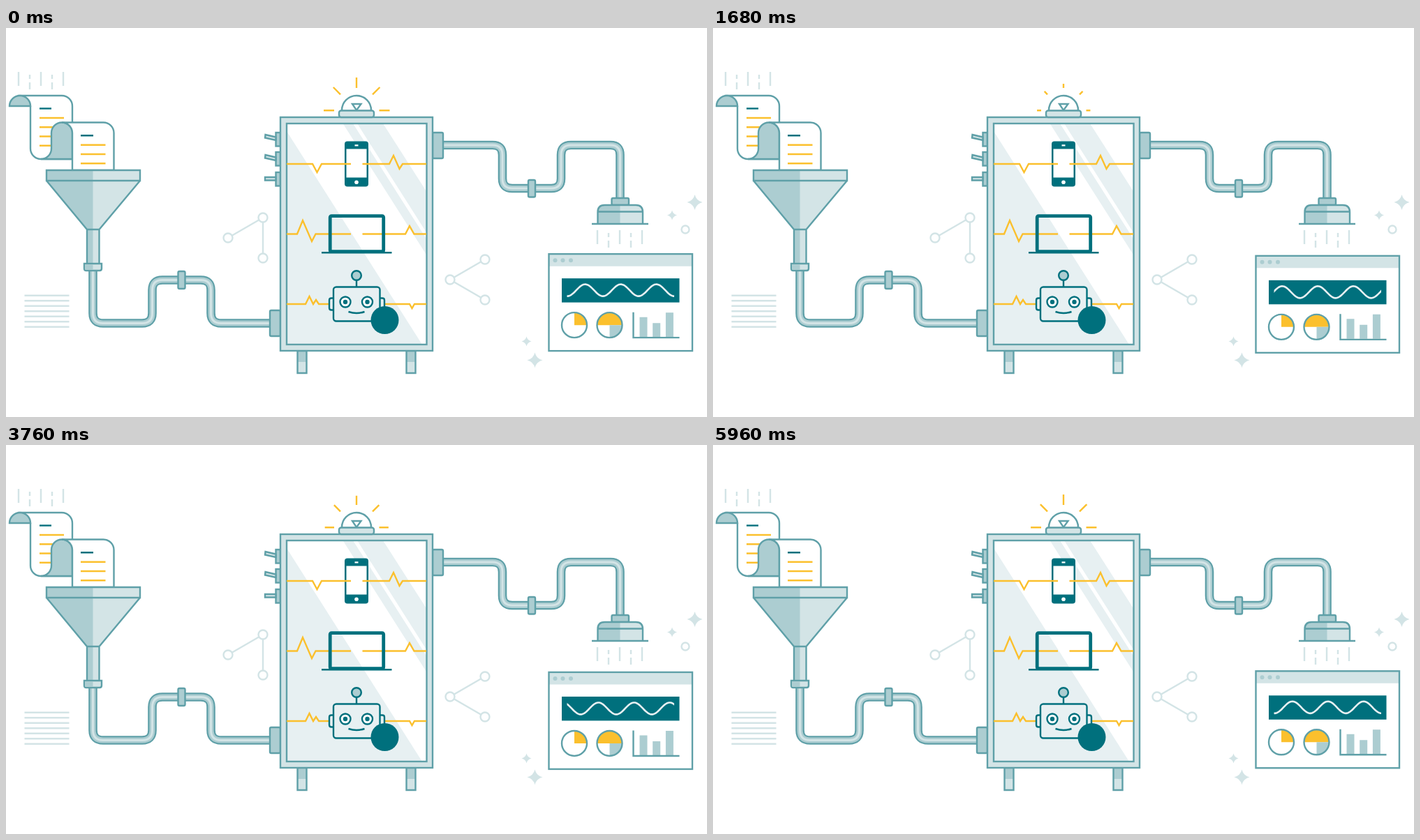
An HTML page for the animation above (6 s loop, 1004 by 558 pixels).

```html
<!DOCTYPE html>
<html lang="en">
<head>
<meta charset="utf-8">
<title>Content machine</title>
<style>
  html, body { margin: 0; width: 100%; height: 100%; overflow: hidden; background: #fff; }
  svg { display: block; width: 100%; height: 100%; }
  .outline { stroke: #5fa0a8; stroke-width: 2.4; }
  .light { fill: #d3e4e6; }
  .mid { fill: #accdd1; }
  .white { fill: #fff; }
  .dark { fill: #00707d; }
  .yellow { fill: #fbc02d; }
  .none { fill: none; }
  .faint { stroke: #d3e4e6; stroke-width: 2.4; fill: none; }
  .signal { stroke: #fbc02d; stroke-width: 2.4; fill: none; }
  .ink { stroke: #00707d; stroke-width: 2.4; fill: none; }
</style>
</head>
<body>
<svg viewBox="0 0 1004 558">
  <defs>
    <path id="rain" d="M0 0V20M16 4V10M16 15V25M32 0V20M48 4V10M48 15V25M64 0V20"/>
    <path id="star" d="M0-1Q.2-.2 1 0Q.2.2 0 1Q-.2.2-1 0Q-.2-.2 0-1Z"/>
    <path id="pipeIn" d="M124.5 348V409Q124.5 423.5 139 423.5H195Q209.5 423.5 209.5 409V376Q209.5 361.500 224 361.500H279Q293.500 361.500 293.500 376V409Q293.500 423.500 308 423.500H378"/>
    <path id="pipeOut" d="M626 168H697Q711 168 711 182V216Q711 230 725 230H781Q795 230 795 216V182Q795 168 809 168H866Q879.500 168 879.500 182V244"/>
    <g id="knob" class="outline"><rect class="mid" x="386.500" width="6.500" height="19.500"/></g>
    <g id="leg"><path class="light" d="M0 463H13V495H0Z"/><path class="mid" d="M0 463H13V479H0Z"/><path class="outline none" d="M0 463H13V495H0Z"/></g>
    <clipPath id="page1"><rect x="36" y="104" width="58" height="73"/></clipPath>
    <clipPath id="page2"><rect x="96" y="142.500" width="58" height="55.500"/></clipPath>
    <clipPath id="waveArea"><rect x="803.500" y="359" width="153.500" height="35"/></clipPath>
  </defs>

  <!-- background ornaments -->
  <g class="faint">
    <use href="#rain" x="18" y="63"/><use href="#rain" x="847" y="290"/>
    <path id="textLines"/>
    <path d="M318 301L368 272V330M686 332L636 361L686 390"/>
    <g class="white">
      <circle cx="368" cy="272" r="6.500"/><circle cx="318" cy="301" r="6.500"/><circle cx="368" cy="330" r="6.500"/>
      <circle cx="686" cy="332" r="6.500"/><circle cx="636" cy="361" r="6.500"/><circle cx="686" cy="390" r="6.500"/>
      <circle cx="973" cy="289" r="5.500"/>
    </g>
  </g>
  <g class="light">
    <use href="#star" transform="translate(986.500 250) scale(11)"/>
    <use href="#star" transform="translate(954 268.500) scale(7)"/>
    <use href="#star" transform="translate(745.500 449.500) scale(7)"/>
    <use href="#star" transform="translate(757.500 476.500) scale(11)"/>
  </g>

  <!-- paper -->
  <path class="outline white" d="M20 97H80A15 15 0 0 1 95 112V188H50A15 15 0 0 1 35 173V112Z"/>
  <path id="curl" class="outline mid"/>
  <g clip-path="url(#page1)"><g class="lines"><path class="ink" d="M48 115.500H65"/><path class="signal" d="M48 129H83M48 142.200H83M48 155.500H83M48 168.800H83M48 182H83"/></g></g>
  <path class="outline mid" d="M50 188A15 15 0 0 0 65 173V150.500A15 15 0 0 1 95 150.500V188Z"/>
  <path class="outline white" d="M80 135.500H139.500A15 15 0 0 1 154.500 150.500V204H95V150.500A15 15 0 0 0 80 135.500Z"/>
  <g clip-path="url(#page2)"><g class="lines"><path class="ink" d="M107 154.300H125"/><path class="signal" d="M107 167.800H142.500M107 181H142.500M107 194.300H142.500M107 207.600H142.500"/></g></g>

  <!-- pipes and funnel -->
  <g id="pipes" fill="none"></g>
  <path class="light" d="M58 204H192V219L133.500 289V338H116V289L58 219Z"/>
  <path class="mid" d="M58 204H124.500V338H116V289L58 219Z"/>
  <path class="outline none" d="M58 204H192V219H58ZM58 219L116 289H133.500L192 219M116 289V338M133.500 289V338"/>
  <path class="outline light" d="M112 338H137V345Q137 348 134 348H115Q112 348 112 345Z"/>
  <path class="mid" d="M113.200 339.200H124.500V346.800H113.200Z"/>
  <g class="outline mid">
    <rect x="246.500" y="349" width="10" height="25" rx="2"/>
    <rect x="748" y="218" width="10" height="24.500" rx="2"/>
    <rect x="378" y="405" width="15" height="37" rx="2"/>
    <rect x="611" y="150" width="15" height="37" rx="2"/>
  </g>
  <rect class="outline mid" x="867.500" y="244" width="24.500" height="10" rx="2"/>
  <path class="light" d="M847.500 281V264Q847.500 254 857.500 254H902Q912 254 912 264V281Z"/>
  <path class="mid" d="M847.500 281V264Q847.500 254 857.500 254H879.500V281Z"/>
  <path class="outline none" d="M847.500 281V264Q847.500 254 857.500 254H902Q912 254 912 264V281M847.500 263.500H912M839 281H920"/>

  <!-- machine -->
  <use href="#knob" y="150"/><use href="#knob" y="178"/><use href="#knob" y="207"/>
  <g class="outline light"><path d="M371.500 153L386.500 156.500V161L371 157.500ZM371.500 182L386.500 185.500V190L371 186.500ZM371 214H386.500V218.500H371Z"/></g>
  <use href="#leg" x="417.500"/><use href="#leg" x="573.500"/>
  <rect class="outline light" x="393" y="128" width="218" height="335"/>
  <rect class="white" x="402" y="137" width="200.500" height="317"/>
  <path fill="#e7f0f2" d="M402 148L596 454H402ZM482.500 137H497L602.500 303V326ZM503 137H540L602.500 235V294Z"/>
  <rect class="outline none" x="402" y="137" width="200.500" height="317"/>
  <path class="outline white" d="M481 119V118A21 21 0 0 1 523 118V119Z"/>
  <path class="outline none" d="M496 109H508.500L502 118Z"/>
  <rect class="outline light" x="477" y="118.500" width="50" height="9.500" rx="3"/>
  <path id="rays" class="signal"/>

  <rect class="dark" x="485" y="162.500" width="34" height="65" rx="4"/>
  <path class="white" d="M487.500 173.500H516.500V214.500H487.500ZM499.500 167.200H504.500V169.500H499.500Z"/>
  <circle class="white" cx="502" cy="221.200" r="2.800"/>
  <g class="signal">
    <path d="M402 195H439L445.500 207L452 195H494M510.500 195H549L555 183L563.500 202L568 195H602"/>
    <path d="M402 295.500H417L425 276L438 306L443.500 295.500H494M510.500 295.500H572L578 284L584.500 295.500H602"/>
    <path d="M402 396H429L434.500 385L440 396L444 390L448 396H463M543 396H578L581.500 402L585 396H602"/>
  </g>
  <rect class="ink" x="464.200" y="269.700" width="76.500" height="51" rx="2" style="stroke-width:4.800"/>
  <path class="ink" d="M452 322.200H552.500"/>
  <g class="ink">
    <path d="M502 362V371.500M469 387.500H466Q463 387.500 463 390.500V401.500Q463 404.500 466 404.500H469M535.500 387.500H539Q542 387.500 542 390.500V401.500Q542 404.500 539 404.500H535.500M490.500 407Q502 411 513.500 407"/>
    <circle class="mid" cx="502" cy="355" r="6.800"/>
    <rect x="469" y="371.500" width="66.500" height="49" rx="4" fill="#e7f0f2"/>
    <path d="M490.500 407Q502 411 513.500 407"/>
    <circle class="white" cx="486" cy="393" r="7.500"/><circle class="white" cx="517.500" cy="393" r="7.500"/>
  </g>
  <g class="dark"><circle cx="486" cy="393" r="3.200"/><circle cx="517.500" cy="393" r="3.200"/><circle cx="542.500" cy="419" r="20"/></g>

  <!-- dashboard -->
  <g id="board">
    <rect class="white" x="777.500" y="324" width="205.500" height="139"/>
    <path class="light" d="M777.500 324H983V341.500H777.500Z"/>
    <rect class="outline none" x="777.500" y="324" width="205.500" height="139"/>
    <g class="mid"><circle cx="786.500" cy="333" r="3"/><circle cx="797.500" cy="333" r="3"/><circle cx="809" cy="333" r="3"/></g>
    <rect class="dark" x="796" y="359" width="168.500" height="34.500"/>
    <path id="wave" clip-path="url(#waveArea)" fill="none" stroke="#e7f0f2" stroke-width="2.600"/>
    <path class="yellow" d="M814 426V408A18 18 0 0 1 832 426ZM846.500 426A18 18 0 0 1 882.500 426Z"/>
    <path class="mid" d="M864.500 426H882.500A18 18 0 0 1 864.500 444Z"/>
    <g class="outline none"><circle cx="814" cy="426" r="18"/><circle cx="864.500" cy="426" r="18"/></g>
    <path id="bars" class="mid"/>
    <path class="outline none" d="M898.500 407.500V444H964.500"/>
  </g>
</svg>
<script>
const LOOP = 6000;
const $ = id => document.getElementById(id);
const set = (id, d) => $(id).setAttribute('d', d);
const swing = phase => (1 - Math.cos(2 * Math.PI * phase)) / 2;
const bump = (t, start, end) => t > start && t < end ? swing((t - start) / (end - start)) : 0;

set('textLines', Array.from({ length: 7 }, (_, i) => `M26.500 ${383.7 + i * 7.5}H90.500`).join(''));

for (const pipe of ['pipeIn', 'pipeOut'])
  for (const [color, width] of [['#5fa0a8', 12.6], ['#accdd1', 8], ['#d3e4e6', 3]])
    $('pipes').innerHTML += `<use href="#${pipe}" stroke="${color}" stroke-width="${width}"/>`;

function wavePath(shift) {
  let d = '';
  for (let x = 800; x <= 962; x += 1.5) {
    const y = 376 + 8.5 * Math.cos(2 * Math.PI * (x - 804 + shift) / 51);
    d += `${d ? 'L' : 'M'}${x} ${y.toFixed(2)}`;
  }
  return d;
}

function draw(t) {
  const scroll = bump(t % 2000, 0, 920);
  for (const lines of document.querySelectorAll('.lines'))
    lines.setAttribute('transform', `translate(0 ${-15 * scroll})`);
  set('curl', `M5 ${112 + 8.5 * scroll}V112A15 15 0 0 1 35 112V${112 + 8.5 * scroll}Z`);

  const grow = 10 * swing(t / 1200), diag = 6.5 * swing(t / 1200);
  set('rays', `M502 ${71 + grow}V86M${455 + grow} 118.300H470M${549.5 - grow} 118.300H534.500` +
    `M${468.8 + diag} ${85 + diag}L479 95.300M${535.4 - diag} ${85 + diag}L525 95.300`);

  $('board').setAttribute('transform', `translate(0 ${7.9 * swing((t - 90) / 2000)})`);
  set('wave', wavePath(51 * t / LOOP));

  const pulse = bump(t, 2900, 3700);
  const heights = [29.5 - pulse, 21 + 2 * pulse, 36 - 2.5 * pulse];
  set('bars', heights.map((h, i) => `M${907.5 + 18.7 * i} 443V${444 - h}h11V443Z`).join(''));
}

function tick() {
  draw(performance.now() % LOOP);
  requestAnimationFrame(tick);
}
tick();
</script>
</body>
</html>
```
